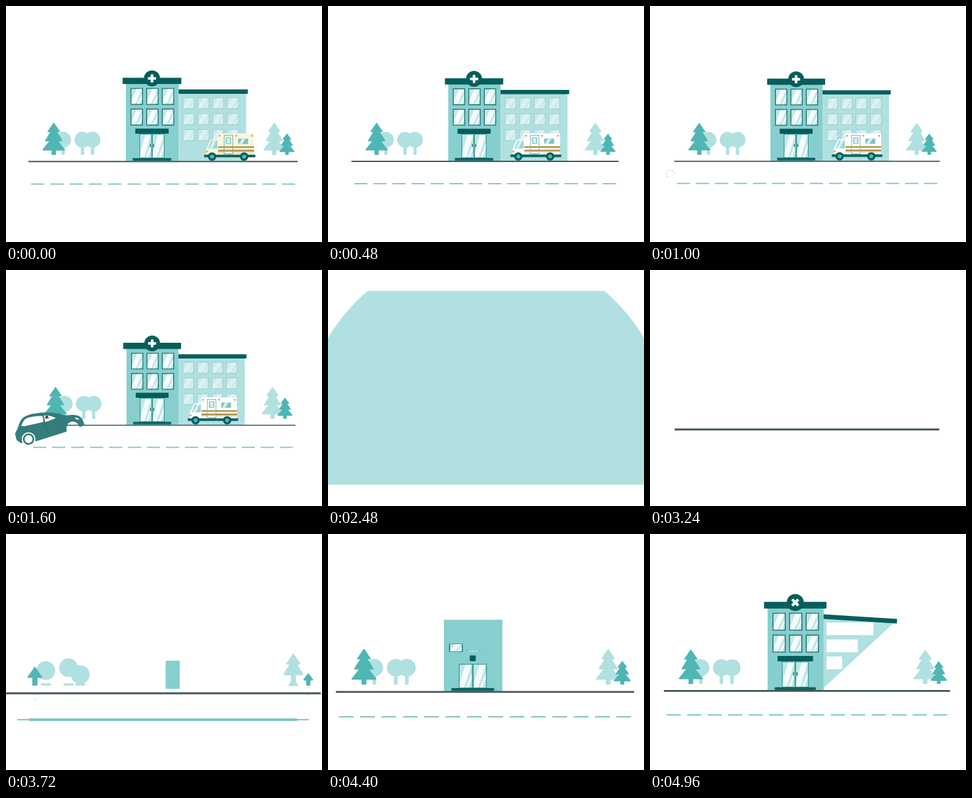
Animation of 480 by 360 pixels, one loop 5000 ms. Source, as an HTML page with a canvas:

```html
<!DOCTYPE html>
<html lang="en">
<head>
<meta charset="utf-8">
<title>Hospital</title>
<style>
html, body { margin: 0; width: 100%; height: 100%; overflow: hidden; background: #fff; }
canvas { display: block; }
</style>
</head>
<body>
<canvas id="stage" width="480" height="360"></canvas>
<script>
const ctx = document.getElementById('stage').getContext('2d');
const LOOP = 5000, CUT = 2280, SKIP = 5800;
const DARK = '#055e5c', MID = '#86cfce', PALE = '#b1e0e1', LEAF = '#4fb6b5', GROUND = '#44565a',
      DASH = '#7ac4c1', GLASS = '#c3e6e8', CAR = '#337d7b', GOLD = '#b6964f';
let now = 0;

const clamp = v => Math.max(0, Math.min(1, v));
const ramp = (a, b) => { const p = clamp((now - a) / (b - a)); return p * p * (3 - 2 * p); };

// Linear interpolation through time, value, time, value, ...
function keys(...k) {
  if (now <= k[0]) return k[1];
  for (let i = 2; i < k.length; i += 2)
    if (now <= k[i]) return k[i - 1] + (k[i + 1] - k[i - 1]) * (now - k[i - 2]) / (k[i] - k[i - 2]);
  return k[k.length - 1];
}

function rect(color, x0, y0, x1, y1, r = 0) {
  if (x1 <= x0 || y1 <= y0) return;
  ctx.fillStyle = color;
  ctx.beginPath();
  ctx.roundRect(x0, y0, x1 - x0, y1 - y0, r);
  ctx.fill();
}

function disc(color, x, y, r) {
  ctx.fillStyle = color;
  ctx.beginPath();
  ctx.arc(x, y, Math.max(0, r), 0, 7);
  ctx.fill();
}

function poly(color, ...p) {
  ctx.fillStyle = color;
  ctx.beginPath();
  for (let i = 0; i < p.length; i += 2) ctx.lineTo(p[i], p[i + 1]);
  ctx.closePath();
  ctx.fill();
}

function path(color, d) {
  ctx.fillStyle = color;
  ctx.fill(new Path2D(d));
}

function line(color, width, x0, y0, x1, y1) {
  ctx.strokeStyle = color;
  ctx.lineWidth = width;
  ctx.beginPath();
  ctx.moveTo(x0, y0);
  ctx.lineTo(x1, y1);
  ctx.stroke();
}

function at(x, y, angle, scale, draw) {
  if (scale <= 0) return;
  ctx.save();
  ctx.translate(x, y);
  ctx.rotate(angle);
  ctx.scale(scale, scale);
  draw();
  ctx.restore();
}

function pane(x, y, w, h, frame, glass, shine, p = 1) {
  if (p <= 0) return;
  ctx.save();
  ctx.translate(x, y + h * (1 - p));
  ctx.scale(1, p);
  ctx.beginPath();
  ctx.rect(0, 0, w, h);
  ctx.clip();
  rect(glass, 0, 0, w, h);
  poly(shine, w * .5, 0, w * .95, 0, w * .35, h, 0, h, 0, h * .9);
  poly(shine, w, h * .3, w, h * .5, w * .65, h, w * .5, h);
  ctx.strokeStyle = frame;
  ctx.lineWidth = 2.4;
  ctx.strokeRect(0, 0, w, h);
  ctx.restore();
}

function pine(color, x, top, half, p) {
  if (p <= 0) return;
  const full = 227 - top, apex = 227 - full * p, trunk = 3.3 * Math.sqrt(half / 17);
  rect(color, x - trunk, apex + 4, x + trunk, 227, 1);
  for (let i = 0; i < 3; i++) {
    const size = clamp(p * 4 - 1 - i), y = apex + full * (.3 + .28 * i), w = half * (.56 + .22 * i) * size;
    poly(color, x, y - full * (i ? .46 : .3) * size, x + w, y - 1, x + w - 1, y, x - w + 1, y, x - w, y - 1);
  }
}

function roundTree(x, rise, trunk) {
  if (rise <= 0) return;
  const half = 6.5 - 4 * trunk;
  rect(PALE, x - half, 224 - 16 * trunk, x + half, 227, 1.5);
  disc(PALE, x, 226 - 22 * rise, 12 * clamp(rise * 2));
}

function trees() {
  const late = ramp(3850, 4300);
  roundTree(89, ramp(3350, 3850), late);
  roundTree(118, ramp(3250, 3720), late);
  roundTree(133, ramp(3420, 3950), late);
  pine(LEAF, 75, 178, 17, ramp(3480, 3960));
  pine(PALE, 405, 178, 16.5, keys(3400, 0, 3700, .85, 3920, .87, 4200, 1));
  pine(LEAF, 424, 194.5, 11.5, ramp(3480, 3960));
}

function road() {
  const g = 202 * ramp(2960, 3340);
  if (g > 0) line(GROUND, keys(4960, 2.5, 6900, 1.6), 239 - g, 236.8, 238 + g, 236.8);
  const reach = 200 * ramp(3300, 3800), gap = 9 * ramp(3730, 4250), thick = 1.8 + 1.4 * ramp(3500, 3720) * (1 - ramp(3750, 4100));
  if (reach <= 0) return;
  if (!gap) {
    line(DASH, 1.8, 239 - reach, 270.6, 238 + reach, 270.6);
    line(DASH, thick, 239 - reach * .92, 270.6, 238 + reach * .92, 270.6);
  } else for (let i = 0; i < 14; i++) {
    const mid = 51 + i * 28.85, half = (28.9 - gap) / 2;
    line(DASH, thick, mid - half, 270.6, mid + half, 270.6);
  }
}

function wing() {
  const grow = ramp(4600, 4960), open = ramp(4950, 5500);
  if (!grow) return;
  const right = 262 + 101 * grow, drop = 6.5 * (1 - open), floor = 232.5 + 3.5 * open;
  ctx.save();
  ctx.beginPath();
  ctx.moveTo(262, 131);
  ctx.lineTo(right, 132 + drop);
  ctx.lineTo(262 + (right - 262) * open, floor);
  ctx.lineTo(262, floor);
  ctx.clip();
  rect(PALE, 262, 128, 363, 236);
  for (let r = 0; r < 3; r++)
    for (let c = 0; c < 4; c++) {
      if (now < 4640 + 130 * (r + c)) continue;
      const x = 268 + 22 * c, y = 140 + 24 * r;
      pane(x, y, 18, 18, '#9dd1d2', '#c9eaeb', '#daf2f2');
      rect(`rgba(255, 255, 255, ${1 - open})`, x - 2, y, x + 20, y + 18);
    }
  ctx.restore();
  at(262, 131.5, Math.atan2(drop, 102), 1, () => rect(DARK, -1, -3, 103.5 * grow, 3.5, 1));
}

function tower() {
  if (now < 3560) return;
  const left = keys(3560, 260, 3720, 242, 4200, 183), top = keys(3560, 231, 3720, 195, 3920, 186, 4480, 131, 4600, 119);
  rect(MID, left, top, 260 + 2 * ramp(3720, 4000), 231 + 5 * ramp(3720, 4000), 1);
  for (let r = 0; r < 2; r++)
    for (let c = 0; c < 3; c++) {
      const start = 4420 - 120 * r + 70 * c;
      pane(190 + 23.4 * c, 126.3 + 31 * r, 18.5, 25.2, '#0c6664', GLASS, '#f5fcfc', ramp(start, start + 220));
    }
  const door = ramp(4200, 4450), sill = 29 * ramp(4150, 4350), hood = 25 * ramp(4350, 4550), roof = 44 * ramp(4520, 4760);
  pane(203, 195, 19, 37, '#379b99', GLASS, '#f5fcfc', door);
  pane(222, 195, 19, 37, '#379b99', GLASS, '#f5fcfc', door);
  if (door === 1) for (const x of [219.5, 224.5]) line(DARK, 1.2, x, 210.5, x, 215);
  rect('#0a6664', 222 - sill, 231.5, 222 + sill, 235.5, 1);
  rect(DARK, 222 - hood, 187.3, 222 + hood, 195, 1);
  rect(DARK, 222 - roof, 110.8, 222 + roof, 120.3, 1);
  at(222, 111.8, Math.PI / 4 * (1 - ramp(4960, 5550)), ramp(4650, 4880), () => {
    disc(DARK, 0, 0, 12);
    rect('#fff', -6.2, -2, 6.2, 2, 1);
    rect('#fff', -2, -6.2, 2, 6.2, 1);
  });
}

function ambulance() {
  if (now < SKIP) return;
  const left = Math.pow(1 - clamp((now - SKIP) / 700), 3);
  const body = `hsl(52 70% ${100 - 8 * left}%)`;
  at(276 + 24 * left, 194.3, 0, 1, () => {
    path(body, 'M22 0H74Q75 0 75 1V34H3V24L9 11Q10 9 13 9H21V1Z');
    path('#9ed8d8', 'M11 11H20V23H6Z');
    poly('#dff3f3', 14, 11, 18, 11, 12, 23, 8, 23);
    rect(GOLD, 21, 19.5, 75, 22);
    rect(GOLD, 21, 24.8, 75, 27.6);
    line('#d8c79a', .8, 21, 29.5, 75, 29.5);
    rect(body, 30, 3, 43, 31);
    ctx.strokeStyle = '#5f9d9a';
    ctx.lineWidth = .8;
    ctx.strokeRect(30, 3, 13, 28);
    rect(GOLD, 30.5, 19.5, 42.5, 22);
    rect(GOLD, 30.5, 24.8, 42.5, 27.6);
    rect('#79c5c5', 32.5, 6, 40.5, 16, 1);
    rect('#d8f0f0', 34, 7, 39, 15, 1);
    rect('#79c5c5', 51, 8, 66, 16, 1);
    poly('#d8f0f0', 57, 8, 62, 8, 57, 16, 52, 16);
    for (const x of [23.5, 48, 72]) rect('#d3a044', x - 1.3, 2.5, x + 1.3, 5, .8);
    rect('#e0b45d', 3, 26, 6, 29, 1);
    rect('#0a6462', 0, 32, 77, 36, 1.5);
    for (const x of [12, 60]) {
      disc(DARK, x, 35, 6.3);
      disc('#4fb6b5', x, 35, 3);
    }
  });
}

function wheel(x, p) {
  at(x, 0, 0, p, () => {
    disc('#fff', 0, 0, 10.5);
    disc(CAR, 0, 0, 8.7);
    disc('#fff', 0, 0, 6);
  });
}

function car() {
  const base = SKIP, burst = clamp((now - base - 920) / 220);
  if (burst > 0 && burst < 1)
    for (let i = 0; i < 6; i++) {
      const a = 2.4 + i * .75, r = 3 + 5 * burst, c = Math.cos(a), s = Math.sin(a);
      line('#a5d9d6', 1, 31 + c * r, 256 + s * r, 31 + c * (r + 2.5), 256 + s * (r + 2.5));
    }
  const tilt = -14 * (1 - ramp(base + 1610, base + 1800)) - 2 * Math.sin(Math.PI * ramp(base + 1800, base + 1950));
  at(34, 258, tilt * Math.PI / 180, 1, () => {
    at(0, 0, 0, ramp(base + 1220, base + 1480), () => {
      path(CAR, 'M-13 3L-18-3L-18-13Q-13-18-9-25Q-3-34 4-35Q12-37 20-35.5Q32-34.5 43-31Q54-28 64-21.5Q76-20 81-17Q86-14 87-9L88 0L80 1Q78-10 69-10Q60-9 59 3L11 6Z');
      path('#fff', 'M-6-22Q-1-30 4-31.5Q16-33 29-29L28.5-20L-1-20.5Z');
      path('#fff', 'M31-29Q40-28 48-21L31-19Z');
      disc('#3c3029', 35, -25.5, 2.4);
      disc('#c99a7c', 36.5, -24, 1.7);
      poly('#fff', 76, -15, 81, -13, 82, -10, 77, -12);
      line('#25696a', .8, 29, -19, 31, 0);
    });
    wheel(0, ramp(base + 1060, base + 1240));
    wheel(70, ramp(base + 1620, base + 1760));
  });
}

function iris() {
  const r = .584 * (2957 - now);
  if (r <= 0) return;
  ctx.save();
  ctx.beginPath();
  ctx.rect(0, 32, 480, 295.5);
  ctx.clip();
  disc(PALE, 240, 244, r);
  ctx.restore();
}

function render(ms) {
  const t = ms % LOOP;
  now = t < CUT ? t + SKIP : t;
  rect('#fff', 0, 0, 480, 360);
  iris();
  const zoom = keys(3400, 1.2, 3720, 1.19, 3960, 1.17, 4500, 1.114, 4960, 1.079,
                    5800, 1.015, 6400, 1.005, 6900, 1, 8040, .997);
  ctx.save();
  ctx.translate(239, 204);
  ctx.scale(zoom, zoom);
  ctx.translate(-239, -204);
  trees();
  wing();
  tower();
  road();
  ambulance();
  car();
  ctx.restore();
}

const start = performance.now();
function tick() {
  render(performance.now() - start);
  requestAnimationFrame(tick);
}
tick();
</script>
</body>
</html>
```
